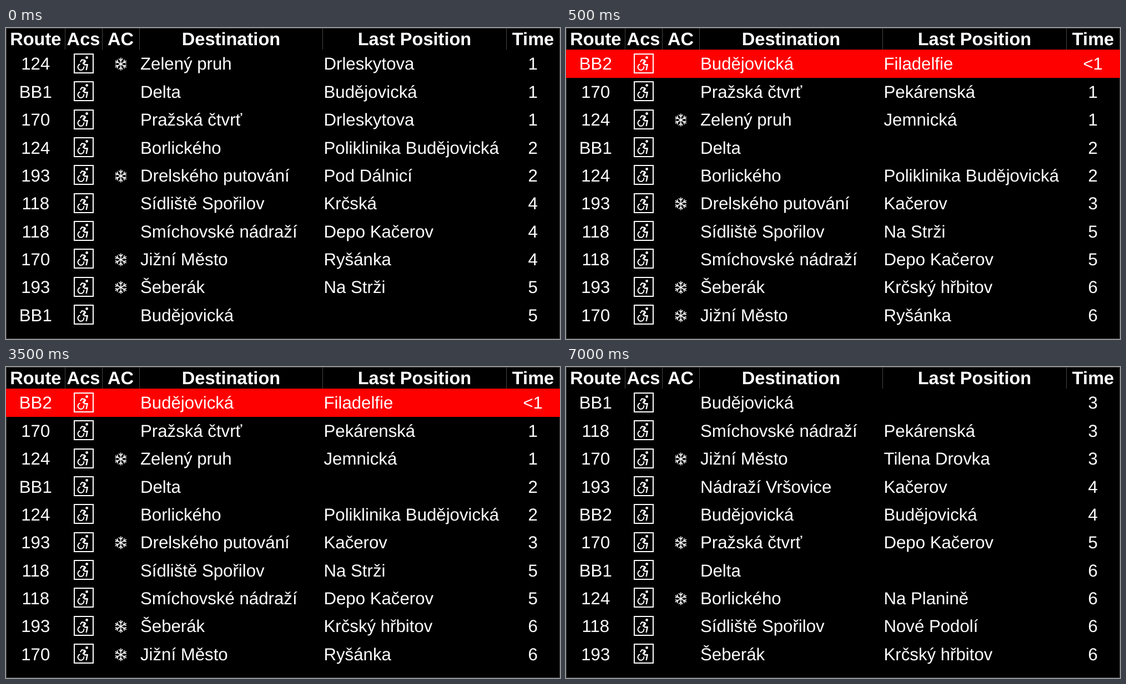
An HTML page for the animation above (8 s loop, 998x561 px).

```html
<!DOCTYPE html>
<html lang="cs">
<head>
<meta charset="utf-8">
<title>Departures</title>
<style>
  html, body { margin: 0; width: 100%; height: 100%; overflow: hidden; background: #000; }
  svg { display: block; width: 998px; height: 561px; }
  text {
    font: 31.2px "Liberation Sans", Arial, sans-serif;
    fill: #fff; text-rendering: geometricPrecision;
  }
  .head { font-size: 32.6px; font-weight: bold; }
  .mid { text-anchor: middle; }
  .rule { fill: none; stroke: #444; }
  .line { fill: none; stroke: #fff; }
</style>
</head>
<body>
<svg viewBox="0 0 998 561">
  <defs>
    <g id="chair" class="line" stroke-width="2">
      <rect x="1" y="1" width="34" height="34"/>
      <circle cx="23.6" cy="7.4" r="2.4" fill="#fff" stroke="none"/>
      <path d="M11.8 15.4L14.8 11.2L20.6 12.2"/>
      <path d="M21 12.4L17 19.4" stroke-width="3.6"/>
      <path d="M18.6 20.2H24.6L22.6 30" stroke-width="2.4"/>
      <path d="M11.6 19.2A5.4 5.4 0 1 0 18.2 23.2"/>
    </g>
    <path id="arm" d="M0 0V-11.5M-3.6 -9.6L0 -6L3.6 -9.6"/>
    <g id="snow" class="line" stroke-width="1.5"></g>
  </defs>
  <path class="rule" d="M.5 .5H997.5V560.5H.5ZM106.5 0V39M173.5 0V39M240.5 0V39M570.5 0V39M901.5 0V39"/>
  <g id="header"></g>
  <g id="rows"></g>
</svg>
<script>
const PITCH = 50.35, LOOP = 8000;
const columns = [["Route", 53.3], ["Acs", 139.5], ["AC", 206.5],
  ["Destination", 405.5], ["Last Position", 736], ["Time", 949.5]];

// Each row: route | air conditioning | destination | last position | minutes
const boards = [
  { from: 0, rows: `124|*|Zelený pruh|Drleskytova|1
BB1||Delta|Budějovická|1
170||Pražská čtvrť|Drleskytova|1
124||Borlického|Poliklinika Budějovická|2
193|*|Drelského putování|Pod Dálnicí|2
118||Sídliště Spořilov|Krčská|4
118||Smíchovské nádraží|Depo Kačerov|4
170|*|Jižní Město|Ryšánka|4
193|*|Šeberák|Na Strži|5
BB1||Budějovická||5` },
  { from: 500, rows: `BB2||Budějovická|Filadelfie|<1
170||Pražská čtvrť|Pekárenská|1
124|*|Zelený pruh|Jemnická|1
BB1||Delta||2
124||Borlického|Poliklinika Budějovická|2
193|*|Drelského putování|Kačerov|3
118||Sídliště Spořilov|Na Strži|5
118||Smíchovské nádraží|Depo Kačerov|5
193|*|Šeberák|Krčský hřbitov|6
170|*|Jižní Město|Ryšánka|6` },
  { from: 5500, rows: `BB1||Budějovická||3
118||Smíchovské nádraží|Pekárenská|3
170|*|Jižní Město|Tilena Drovka|3
193||Nádraží Vršovice|Kačerov|4
BB2||Budějovická|Budějovická|4
170|*|Pražská čtvrť|Depo Kačerov|5
BB1||Delta||6
124|*|Borlického|Na Planině|6
118||Sídliště Spořilov|Nové Podolí|6
193||Šeberák|Krčský hřbitov|6` }
];

const byId = id => document.getElementById(id);
const label = (text, x, y, style = "") =>
  `<text x="${x}" y="${y}" class="${style}">${text.replace("<", "&lt;")}</text>`;
const icon = (id, x, y) => `<use href="#${id}" x="${x}" y="${y}"/>`;

function drawRow(line, index) {
  const [route, ac, destination, last, time] = line.split("|");
  // Each part of a row sits on whole pixels.
  const snap = y => Math.floor(y + index * PITCH);
  const base = snap(75.95), top = snap(39.4), bottom = snap(90);
  const arriving = time === "<1";
  return (arriving ? `<rect y="${top}" width="998" height="${bottom - top}" fill="#f00"/>` : "")
    + label(route, 53.3, base, "mid")
    + icon("chair", 122, snap(46.4))
    + (ac ? icon("snow", 206.8, base - 10) : "")
    + label(destination, 242, base)
    + label(last, 572.5, base)
    + label(time, 949.2, base, "mid");
}

byId("snow").innerHTML = [0, 60, 120, 180, 240, 300]
  .map(angle => `<use href="#arm" transform="rotate(${angle})"/>`).join("");
byId("header").innerHTML = columns.map(([text, x]) => label(text, x, 31, "head mid")).join("");

let shown;
function render() {
  const time = performance.now() % LOOP;
  const board = boards.findLast(b => time >= b.from);
  if (board !== shown) {
    shown = board;
    byId("rows").innerHTML = board.rows.split("\n").map(drawRow).join("");
  }
  requestAnimationFrame(render);
}
render();
</script>
</body>
</html>
```
